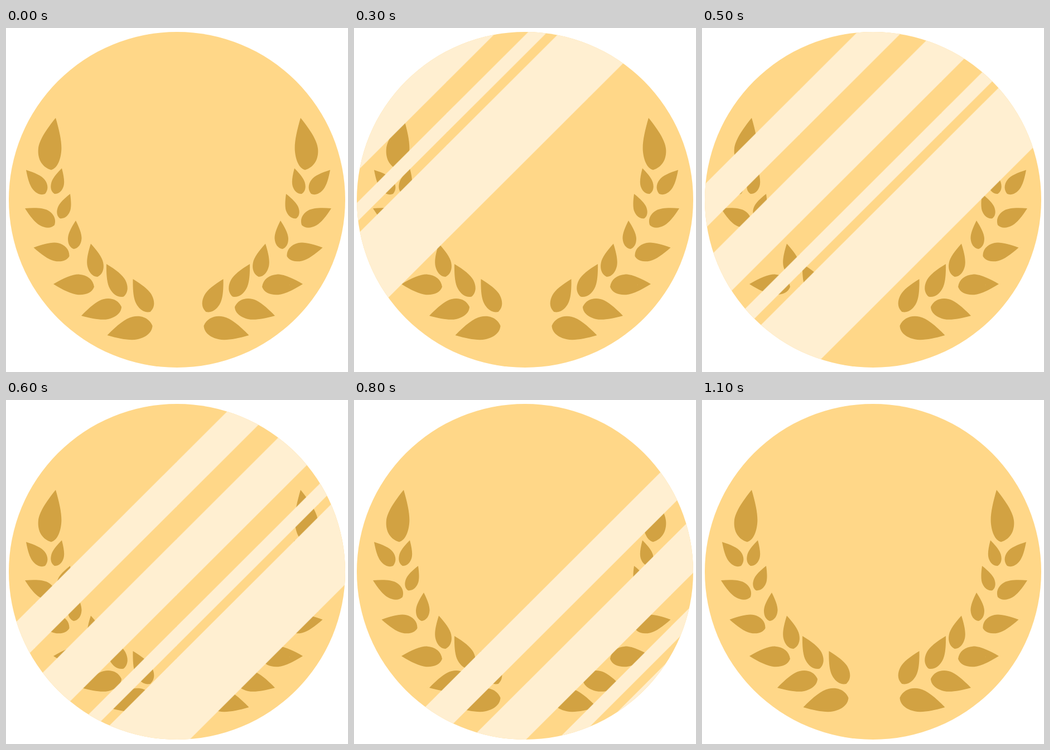
An HTML page that plays this animation: 613x618 px, repeating every 4.1 s.

```html
<!DOCTYPE html>
<html lang="en">
<head>
<meta charset="utf-8">
<title>Laurel coin</title>
<style>
  html, body { margin: 0; width: 100%; height: 100%; overflow: hidden; background: #fff; }
  svg { display: block; }
</style>
</head>
<body>
<svg width="613" height="618" viewBox="0 0 613 618">
  <defs>
    <clipPath id="coin"><circle cx="306.5" cy="308.5" r="301.5"/></clipPath>
  </defs>
  <circle cx="306.5" cy="308.5" r="301.5" fill="#ffd788"/>
  <path id="branch" fill="#d2a242"/>
  <use href="#branch" transform="translate(617) scale(-1 1)"/>
  <g clip-path="url(#coin)"><path id="shine" fill="#ffefd1"/></g>
</svg>
<script>
// One leaf shape for all: only tip and base differ; each row has its own pair of side bulges.
const rows = [
  { bulges: [.28, -.162], leaves: ['89,161.5 81,255'] },
  { bulges: [.22, -.28], leaves: [
    '36,255 70,298', '34,324 87,354', '49.5,394.5 113.5,410',
    '85,460 158,465', '135,517 207,501', '181.5,552 262.5,535'] },
  { bulges: [.23, -.248], leaves: [
    '100,252 87,298', '115,298 96.5,342', '125,346 121.5,397',
    '152,387.5 164,447', '180,424 211,482.5', '227.5,451 258.5,510'] }
];
const widest = .62;

function leafPath(ends, bulges) {
  const [x, y, baseX, baseY] = ends.split(/[ ,]/).map(Number);
  const dx = baseX - x, dy = baseY - y;
  const at = (along, out) =>
    `${(x + dx * along - dy * out).toFixed(2)} ${(y + dy * along + dx * out).toFixed(2)}`;
  const rest = 1 - widest;
  const side = bulge =>
    `M${at(0, 0)}C${at(.4 * widest, .6 * bulge)} ${at(.75 * widest, bulge)} ${at(widest, bulge)}` +
    `C${at(widest + .5 * rest, bulge)} ${at(widest + .9 * rest, .65 * bulge)} ${at(1, 0)}Z`;
  return bulges.map(side).join('');
}

// Diagonal bands, measured back from the leading edge of the shine.
const bands = [[0, 169], [192, 226.5], [283, 383.7], [442.2, 522.3]];
const lead = 152.6, stride = 131.1, ticks = 41, drop = 620;

const bandPath = ([front, back]) =>
  `M${lead - front} 0H${lead - back}l${-drop} ${drop}H${lead - front - drop}Z`;

const branch = document.getElementById('branch');
const shine = document.getElementById('shine');
branch.setAttribute('d', rows.flatMap(({ bulges, leaves }) =>
  leaves.map(ends => leafPath(ends, bulges))).join(''));
shine.setAttribute('d', bands.map(bandPath).join(''));

shine.animate(
  { transform: ['translateX(0px)', `translateX(${stride * ticks}px)`] },
  { duration: ticks * 100, iterations: Infinity, easing: `steps(${ticks}, end)` }
);
</script>
</body>
</html>
```
